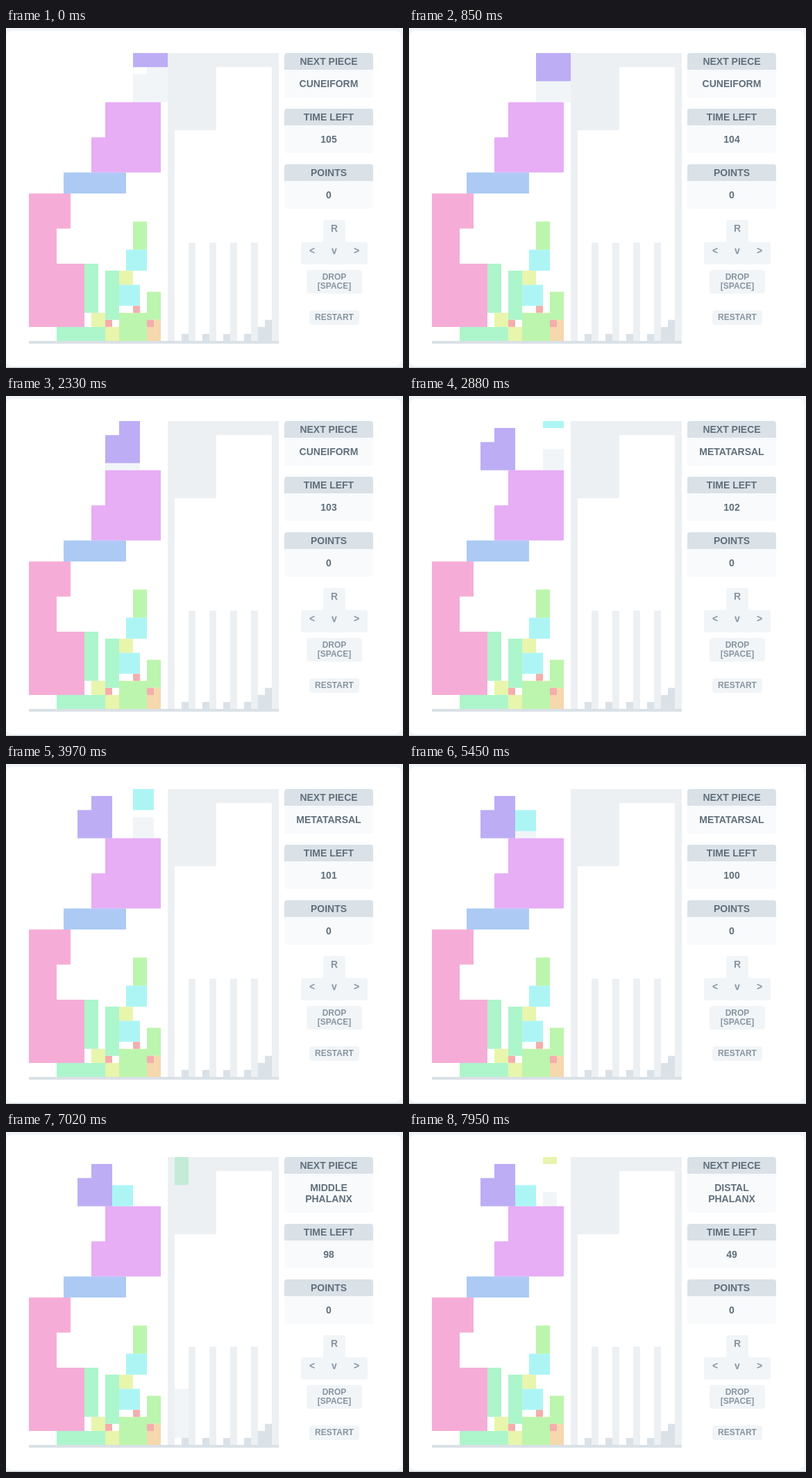
An HTML page with a canvas for the animation above (8 s loop, 572x489 px).

```html
<!DOCTYPE html>
<html lang="en">
<head>
<meta charset="utf-8">
<title>Bone stacking game</title>
<style>
  html, body { margin: 0; width: 100%; height: 100%; overflow: hidden; background: #f1f5f8; }
  body { position: relative; font: bold 14px/16px "Liberation Sans", Arial, sans-serif; color: #606f7b; text-align: center; }
  canvas { position: absolute; left: 0; top: 0; display: block; }
  .side { position: absolute; left: 401px; top: 36px; width: 128px; }
  .panel { margin-bottom: 16px; border-radius: 4px; overflow: hidden; background: #f8fafc; }
  .panel h2 { margin: 0; font: inherit; line-height: 24px; background: #dae1e7; }
  .panel div { padding: 12px 0; white-space: pre-line; }
  .keys { position: relative; left: 8px; color: #8795a1; }
  .key { box-sizing: border-box; margin: 0 auto; padding-top: 4px; width: 32px; height: 32px; background: #f1f5f8; border-radius: 4px; }
  .key.top { border-radius: 4px 4px 0 0; }
  .row { display: flex; width: 96px; margin: 0 auto; background: #f1f5f8; border-radius: 4px; }
  .key.small { font-size: 12px; line-height: 13px; }
  .drop { width: 80px; height: 34px; margin-top: 8px; }
  .restart { width: 72px; height: 21px; margin-top: 24px; }
</style>
</head>
<body>
<canvas id="board" width="572" height="489"></canvas>
<div class="side">
  <div class="panel"><h2>NEXT PIECE</h2><div id="next"></div></div>
  <div class="panel"><h2>TIME LEFT</h2><div id="time"></div></div>
  <div class="panel"><h2>POINTS</h2><div>0</div></div>
  <div class="keys">
    <div class="key top">R</div>
    <div class="row"><div class="key">&lt;</div><div class="key">v</div><div class="key">&gt;</div></div>
    <div class="key small drop">DROP<br>[SPACE]</div>
    <div class="key small restart">RESTART</div>
  </div>
</div>
<script>
const LOOP = 8000, ROWS = 41, CENTER = 17;
const FALL = 515, FIRST_FALL = -215, FAULT_PAUSE = 550;
const DARK = '#dae1e7', GHOST = '#f1f5f8';
const ctx = document.getElementById('board').getContext('2d');
const nextBox = document.getElementById('next');
const timeBox = document.getElementById('time');

// Rectangles are [column, row, width, height] in cells.
const block = (w, h) => [[0, 0, w, h]];
const shift = (rects, col, row) => rects.map(([x, y, w, h]) => [x + col, y + row, w, h]);
const turn = rects => rects.map(([x, y, w, h]) => [y, x, h, w]);

// Each bone takes the next hue around the colour wheel.
const bones = {
  distal: { label: 'DISTAL\nPHALANX', shape: block(1, 1), at: [[15, 36], [11, 38], [17, 38]] },
  hallux: { shape: block(2, 3), at: [[17, 38]] },
  middle: { label: 'MIDDLE\nPHALANX', shape: block(2, 2), at: [[13, 31], [9, 37], [11, 39]] },
  proximal: { shape: block(2, 4), at: [[15, 24], [17, 34], [13, 37], [15, 37]] },
  metatarsal: { label: 'METATARSAL', shape: block(2, 7), at: [[8, 30], [11, 31], [4, 39, true]] },
  cuneiform: { label: 'CUNEIFORM', shape: block(3, 3), at: [[14, 28], [13, 33]] },
  cuboid: { shape: block(9, 3), at: [[5, 17]] },
  navicular: { shape: [[2, 0, 3, 2], [0, 2, 5, 4]], at: [] },
  talus: { shape: [[2, 0, 8, 10], [0, 5, 2, 5]], at: [[9, 7]] },
  calcaneus: { shape: [[0, 0, 6, 5], [0, 5, 4, 14], [4, 10, 4, 9]], at: [[0, 20]] }
};
Object.values(bones).forEach((bone, i) => { bone.color = `hsl(${i * 36}, 78%, 82%)`; });

const stack = Object.values(bones).reverse().flatMap(({ color, shape, at }) =>
  at.map(([c, r, turned]) => ({ color, rects: shift(turned ? turn(shape) : shape, c, r) })));
const slots = [23, 26, 29, 32];
const walls = [[20, 0, 16, 2], [20, 2, 7, 9], [20, 11, 1, 30], [35, 2, 1, 39],
  ...slots.map(c => [c, 27, 1, 14])];
const bumps = [...slots.map(c => [c - 1, 40, 1, 1]), [33, 39, 1, 2], [34, 38, 1, 3]];

const queue = ['navicular', 'cuneiform', 'metatarsal', 'middle', 'distal'].map(name => bones[name]);
// Runs of key presses: start, gap, keys (a space is a hard drop).
const runs = [
  [1930, 120, '<<<<<<<<'], [3030, 80, '<<'], [3570, 140, '<>>'], [4130, 160, '<<'],
  [4750, 0, '<'], [5530, 160, 'v >'], [6320, 165, '>>>>'], [7100, 150, '<< ']
];

const overlap = (a, b) => a.some(([x, y, w, h]) =>
  b.some(([c, r, n, m]) => x < c + n && c < x + w && y < r + m && r < y + h));

const bodyOf = (s, row = s.row) => shift(queue[s.index].shape, s.col, row);

function landing(s) {
  const solid = [[0, ROWS, 36, 1], ...bumps, ...s.placed.flatMap(p => p.rects)];
  let row = s.row;
  while (!overlap(bodyOf(s, row + 1), solid)) row++;
  return row;
}

function spawn(s, index) {
  const shape = queue[index].shape;
  const w = Math.max(...shape.map(r => r[0] + r[2]));
  const h = Math.max(...shape.map(r => r[1] + r[3]));
  return { ...s, index, col: CENTER - Math.floor(w / 2), row: 1 - h, paused: false };
}

function lock(s) {
  const piece = { color: queue[s.index].color, rects: bodyOf(s) };
  return spawn({ ...s, placed: [...s.placed, piece] }, s.index + 1);
}

const fall = s => s.row < landing(s) ? { ...s, row: s.row + 1 } : lock(s);

// Covering the mould halves the time and discards the piece.
function drop(s) {
  const landed = { ...s, row: landing(s) };
  if (!overlap(bodyOf(landed), walls)) return lock(landed);
  return { ...landed, paused: true, time: Math.floor(s.time / 2) };
}

const actions = {
  '<': s => ({ ...s, col: s.col - 1 }),
  '>': s => ({ ...s, col: s.col + 1 }),
  'v': fall,
  ' ': drop,
  tick: fall,
  second: s => fall({ ...s, time: s.time - 1 })
};

function play() {
  const events = runs.flatMap(([t, gap, keys]) => [...keys].map((key, i) => [t + i * gap, key]));
  for (let i = 0, t = FIRST_FALL; t < LOOP; t += FALL, i++) events.push([t, i % 2 ? 'tick' : 'second']);
  events.sort((a, b) => a[0] - b[0]);

  let s = spawn({ placed: stack, time: 106 }, 0), resume = 0;
  const states = [];
  for (const [t, action] of events) {
    if (s.paused) continue;
    s = actions[action](s);
    states.push([t, s]);
    if (s.paused) resume = t + FAULT_PAUSE;
  }
  if (s.paused) states.push([resume, spawn(s, s.index + 1)]);
  return states;
}

const yAt = r => 36 + Math.max(0, r) * 10.1;

function fill(color, rects) {
  ctx.fillStyle = color;
  ctx.beginPath();
  for (const [x, y, w, h] of rects)
    if (y + h > 0) ctx.rect(33 + x * 10, yAt(y), w * 10, yAt(y + h) - yAt(y));
  ctx.fill();
}

function drawCard() {
  ctx.fillStyle = '#f1f5f8';
  ctx.fillRect(0, 0, 572, 489);
  ctx.fillStyle = '#fff';
  ctx.beginPath();
  ctx.roundRect(1, 4, 568, 482, 8);
  ctx.fill();
  ctx.fillStyle = '#c4c8cb';
  ctx.fillRect(0, 488, 572, 1);
}

function setText(box, text) {
  if (box.textContent !== text) box.textContent = text;
}

const states = play();

function draw(t) {
  const s = states.filter(([at]) => at <= t).pop()[1];
  drawCard();
  fill(GHOST, bodyOf(s, landing(s)));
  for (const { color, rects } of s.placed) fill(color, rects);
  fill(queue[s.index].color, bodyOf(s));
  ctx.globalAlpha = 0.5;
  fill(DARK, walls);
  ctx.globalAlpha = 1;
  fill(DARK, bumps);
  ctx.fillRect(33, 450, 360, 4);

  const following = queue[Math.min(s.index + 1, queue.length - 1)];
  setText(nextBox, following.label);
  setText(timeBox, String(s.time));
}

const start = performance.now();
function frame() {
  draw((performance.now() - start) % LOOP);
  requestAnimationFrame(frame);
}
frame();
</script>
</body>
</html>
```
